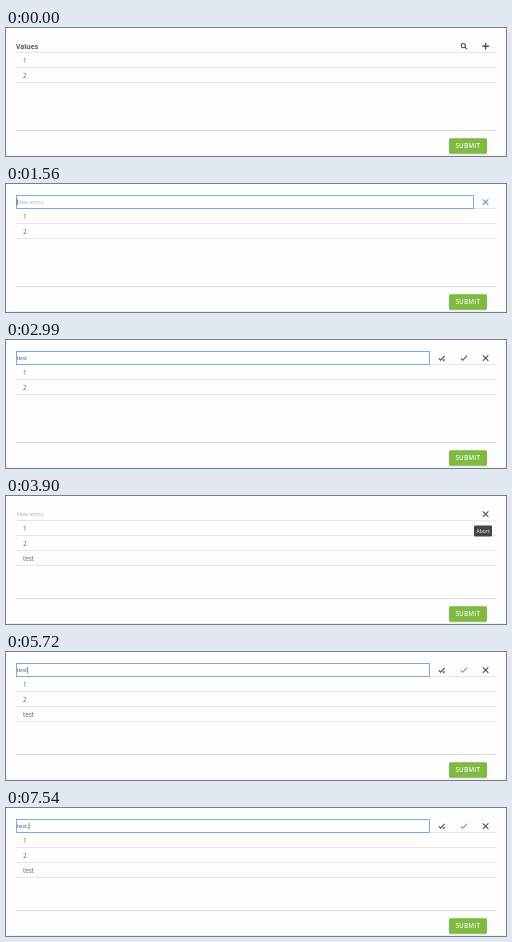
Recreate the animation shown at these times as an HTML page. Size 500 by 128 pixels, loop 8 s.

```html
<!DOCTYPE html>
<html lang="en">
<head>
<meta charset="utf-8">
<title>Editable list</title>
<style>
  html, body { margin: 0; width: 100%; height: 100%; overflow: hidden; background: #fdfdfd; }
  svg { display: block; width: 500px; height: 128px; }
  text { font: 6.3px "Open Sans", sans-serif; fill: #666; white-space: pre; }
  .icon { fill: none; stroke: #505050; stroke-width: 1.15; }
  .line { stroke: #e6e6e6; }
</style>
</head>
<body>
<svg viewBox="0 0 500 128">
  <path class="line" d="M10 24.5H490M10 39.5H490M10 54.5H490"/>
  <path d="M10 102.5H490" stroke="#dcdcdc"/>
  <path d="M0 127.5H500" stroke="#f2f2f2"/>
  <text x="17" y="34.5">1</text>
  <text x="17" y="49.5">2</text>
  <g id="added">
    <text x="17" y="64.5">test</text>
    <path class="line" d="M10 69.5H490"/>
  </g>

  <g id="header">
    <text x="10" y="20.5" style="font-size:6.7px;font-weight:700;fill:#555">Values</text>
    <g class="icon">
      <circle cx="457.3" cy="17.6" r="2.1" stroke-width="1.1"/>
      <path d="M458.9 19.2l2.2 2.2"/>
      <path id="plus" d="M476.2 18.2h6.8M479.6 14.8v6.8" style="stroke-width:1.4"/>
    </g>
  </g>

  <g id="editor">
    <rect id="box" x="10.5" y="11.5" width="457" height="13" fill="#fff" stroke="#7cabe2"/>
    <text id="value" x="10.7" y="20.2"></text>
    <path id="caret" d="M0 14.8v6.6" stroke="#555" stroke-width=".7"/>
    <g id="confirm" class="icon">
      <path d="M432.8 18.3l1.8 1.8l4-4.2"/>
      <path d="M436.8 19.2l2 2m0-2l-2 2" style="stroke-width:.9"/>
      <path id="check" d="M454.7 18.3l2 2l4.2-4.4"/>
    </g>
    <g id="hover">
      <rect x="468" y="12.5" width="22" height="13" rx="1" fill="#dde1e6"/>
      <rect x="468" y="11.5" width="22" height="13" rx="1" fill="#fff"/>
    </g>
    <path id="abort" class="icon" d="M476.8 15.3l5.6 5.6m0-5.6l-5.6 5.6"/>
    <g id="tip">
      <rect x="468" y="29.5" width="18" height="11" rx="1" fill="#454545"/>
      <text x="477" y="37" text-anchor="middle" style="font-size:5px;fill:#fff">Abort</text>
    </g>
  </g>

  <rect x="443" y="110.8" width="38" height="15.4" rx="1.5" fill="#b9cca3"/>
  <rect x="443" y="110.2" width="38" height="15.4" rx="1.5" fill="#7fba42"/>
  <text x="449.4" y="120.2" style="font-weight:600;fill:#f3f9ea;letter-spacing:.2px">SUBMIT</text>
</svg>
<script>
const $ = id => document.getElementById(id);
const show = (id, on) => { $(id).style.display = on ? "" : "none"; };
const stroke = (id, color) => { $(id).style.stroke = color; };
const BLUE = "#5a97dc", DARK = "#505050", LOOP = 8000, BLINK = 520;

// Start time, then the text typed so far; each entry restarts the caret's blinking
const typing = [
  [1430, ""], [1950, "te"], [2080, "tes"], [2210, "test"], [3380, ""],
  [4420, ""], [4680, "te"], [4810, "tes"], [4940, "test"], [5720, "test"], [7540, "test,"]
];

function render(t) {
  const [since, value] = typing.filter(([at]) => at <= t).pop() || [0, ""];
  const editing = t >= 1430;
  const idle = t >= 3380 && t < 4420;
  const second = t >= 4420;
  const text = $("value");

  show("header", !editing);
  show("editor", editing);
  show("added", t >= 3380);
  show("confirm", value);
  show("box", !idle);
  show("hover", idle);
  show("tip", t >= 3640 && t < 4420);
  stroke("plus", t >= 1170 ? BLUE : DARK);
  stroke("abort", t < 1950 ? BLUE : DARK);
  stroke("check", second ? BLUE : DARK);

  $("box").setAttribute("width", value ? 413 : 457);
  text.textContent = value || "New entry";
  text.style.fill = value ? "#555" : "#b0b0b0";
  text.style.fontSize = value ? "6px" : "5.6px";

  const blinkOn = Math.floor((t - since) / BLINK) % 2 === 0;
  const focused = editing && !idle && !(t >= 2730 && t < 3380);
  show("caret", focused && blinkOn);
  const width = value ? text.getComputedTextLength() : 0;
  $("caret").setAttribute("transform", `translate(${11.2 + width} 0)`);
}

function tick() {
  render(performance.now() % LOOP);
  requestAnimationFrame(tick);
}
tick();
</script>
</body>
</html>
```
